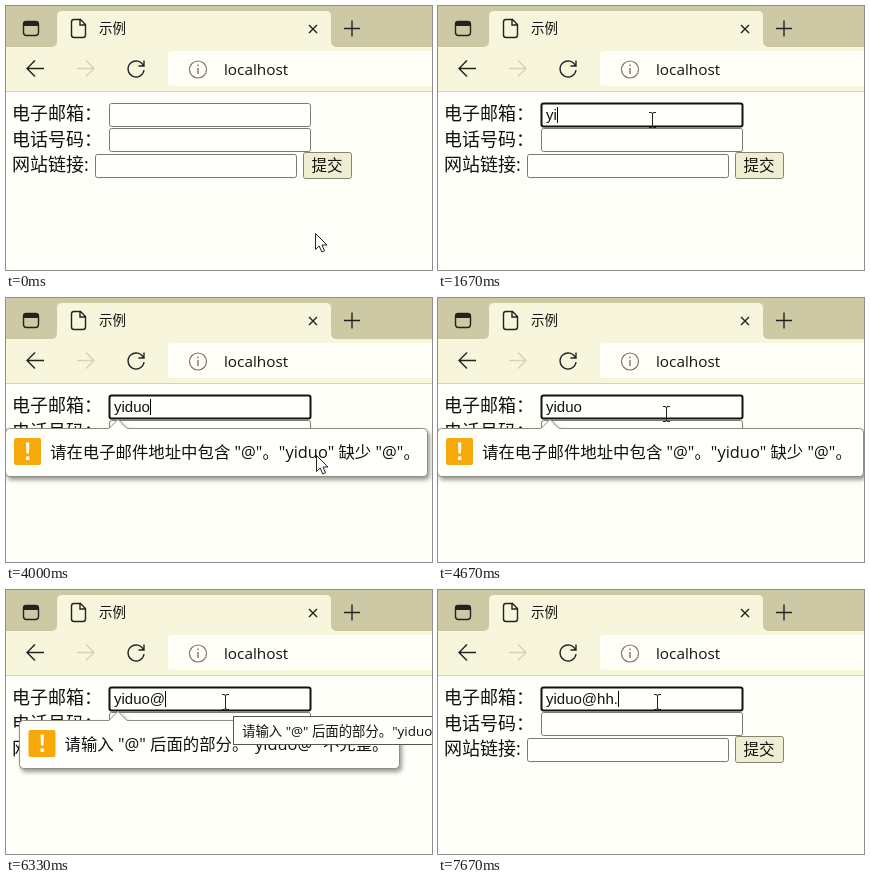
An HTML page for the animation above (8000 ms loop, 426 px wide and 264 px high).

```html
<!DOCTYPE html>
<html lang="zh-CN">
<head>
<meta charset="utf-8">
<title>示例</title>
<style>
html, body { margin: 0; width: 100%; height: 100%; overflow: hidden; background: #fffffa; }
svg { display: block; width: 426px; height: 264px; }
text { font-family: "Open Sans", "Noto Sans CJK SC", "Noto Sans CJK", sans-serif; fill: #111; white-space: pre; }
.label { font-size: 18px; }
.msg { font-size: 16.4px; }
.field { font-family: "Liberation Sans", sans-serif; font-size: 15px; }
.line { fill: none; stroke: #222; stroke-width: 1.4; }
.box { fill: #fffffc; stroke: #7a7a72; }
.bubble { fill: #fffffb; stroke: #8d8d80; filter: drop-shadow(2px 3px 2px #0006); }
</style>
</head>
<body>
<svg viewBox="0 0 426 264">
  <rect width="426" height="264" fill="#fffffa"/>

  <!-- browser chrome -->
  <rect width="426" height="42" fill="#cdc9a5"/>
  <path d="M45 41q6 0 6-6V10q0-5 5-5H320q5 0 5 5V35q0 6 6 6H426V86H0V41Z" fill="#f7f5dc"/>
  <rect y="85" width="426" height="1" fill="#d6d3bc"/>
  <rect x="162" y="45" width="270" height="35" rx="4" fill="#fffff8"/>
  <rect x="17.5" y="15.5" width="15" height="14" rx="3" class="line"/>
  <path d="M17 20V18q0-3 3-3H30q3 0 3 3V20Z" fill="#222"/>
  <path class="line" d="M68 13.500H74.500L79.500 18.500V29q0 2.500-2.500 2.500H68q-2.500 0-2.500-2.500V16q0-2.500 2.500-2.500ZM74 14V19H79"/>
  <path class="line" d="M303 19l8 8m0-8l-8 8M338 22.500h16m-8-8v16"/>
  <path class="line" d="M38 62.500H21m8-8l-8 8 8 8"/>
  <path class="line" style="stroke:#d5d2b8" d="M71 62.500H88m-8-8l8 8-8 8"/>
  <path class="line" d="M137.500 60A8 8 0 1 0 138 64M138 54.500V60H132.500"/>
  <circle cx="192" cy="63.500" r="8.500" class="line" style="stroke:#77776c;stroke-width:1.2"/>
  <path d="M192 62v6M192 58.500v1.800" class="line" style="stroke:#77776c"/>
  <text x="93" y="27" font-size="13.500">示例</text>
  <text x="218" y="69" font-size="15.300">localhost</text>

  <!-- form -->
  <text class="label" x="6" y="114">电子邮箱：</text>
  <text class="label" x="6" y="140">电话号码：</text>
  <text class="label" x="6" y="165">网站链接:</text>
  <rect class="box" id="mail" x="103.500" y="97.500" width="201" height="23" rx="2"/>
  <rect class="box" x="103.500" y="122.500" width="201" height="23" rx="2"/>
  <rect class="box" x="89.500" y="148.500" width="201" height="23" rx="2"/>
  <rect x="297.500" y="146.500" width="48" height="26" rx="2" fill="#efedd2" stroke="#85856f"/>
  <text x="305.500" y="165" font-size="15.500">提交</text>
  <text class="field" id="value" x="108" y="114"></text>
  <path id="caret" d="M.5 101V117" stroke="#000"/>

  <!-- validation bubble -->
  <g id="bubble">
    <path class="bubble" id="shape"/>
    <g id="content">
      <rect x="8" y="140" width="27" height="27" rx="2" fill="#f8a90a"/>
      <path d="M20 144.500h3.400l-.5 11h-2.400ZM20 158.500h3.400v3.400H20Z" fill="#fff"/>
      <text class="msg" id="message" x="44" y="160"></text>
    </g>
  </g>
  <g id="tip">
    <rect x="227.500" y="126.500" width="210" height="28" fill="#fffffa" stroke="#55554c"/>
    <text id="tipText" x="236" y="146" font-size="13.400"></text>
  </g>

  <!-- pointers, hot spot at 0,0 -->
  <path id="arrow" d="M.5.5V16.500L4.200 13 6.800 19 9.500 17.800 7 12H12Z" fill="#fff" stroke="#222"/>
  <path id="beam" class="line" style="stroke-width:1" d="M-3-7.500H-1Q.5-7.500.5-6V6Q.5 7.500-1 7.500H-3M4-7.500H2Q.5-7.500.5-6V6Q.5 7.500 2 7.500H4"/>
</svg>
<script>
const LOOP = 8000, STEPS = 24;
const user = 'yiduo';
const needAt = `请在电子邮件地址中包含 "@"。"${user}" 缺少 "@"。`;
const needRest = `请输入 "@" 后面的部分。"${user}@" 不完整。`;

// Each entry holds from its step until the next one.
const pointer = [[0, 'arrow', 309, 227], [1, 'arrow', 281, 208], [2, 'beam', 214, 114],
  [9, 'arrow', 386, 191], [10, 'arrow', 336, 168], [11, 'arrow', 310, 157],
  [14, 'beam', 228, 116], [15, 'beam', 219, 112]];
const typed = [[0, ''], [4, 'y'], [5, 'yi'], [6, 'yidu'], [7, user],
  [18, user + '@'], [21, user + '@h'], [22, user + '@hh'], [23, user + '@hh.']];
const caretOn = [2, 4, 5, 6, 7, 10, 12, 15, 18, 19, 21, 22, 23];
const bubbles = [[0, ''], [12, needAt, -0.5, 421.5], [13, needAt, -0.5, 425.5], [18, ''],
  [19, needRest, 13.5, 393.5], [21, '']];

const $ = id => document.getElementById(id);
const at = (list, step) => list.findLast(e => e[0] <= step);
const show = (id, on) => $(id).style.display = on ? '' : 'none';
const move = (id, x, y) => $(id).setAttribute('transform', `translate(${x} ${y})`);

function bubblePath(l, r) {
  const t = 130.5, b = 178.5;
  return `M${l + 4} ${t}H103L112 121.500 121 ${t}H${r - 4}q4 0 4 4V${b - 4}q0 4-4 4H${l + 4}q-4 0-4-4V${t + 4}q0-4 4-4Z`;
}

function draw(step) {
  const focus = step >= 2;
  $('mail').style.cssText = focus ? 'stroke:#111;stroke-width:2' : '';

  $('value').textContent = at(typed, step)[1];
  show('caret', caretOn.includes(step));
  move('caret', Math.round(108 + $('value').getComputedTextLength()), 0);

  const [, text, left, right] = at(bubbles, step);
  show('bubble', text);
  if (text) {
    $('message').textContent = text;
    $('shape').setAttribute('d', bubblePath(left, right));
    move('content', left > 0 ? 14.5 : 0, 0);
  }
  show('tip', step === 19 || step === 20);

  const [, kind, x, y] = at(pointer, step);
  show('arrow', kind === 'arrow');
  show('beam', kind === 'beam');
  move(kind, x, y);
}

$('tipText').textContent = needRest;
let start, last;
function tick(now) {
  start ??= now;
  const step = Math.floor(((now - start) % LOOP + 3.4) / LOOP * STEPS) % STEPS;
  if (step !== last) draw(last = step);
  requestAnimationFrame(tick);
}
draw(0);
requestAnimationFrame(tick);
</script>
</body>
</html>
```
